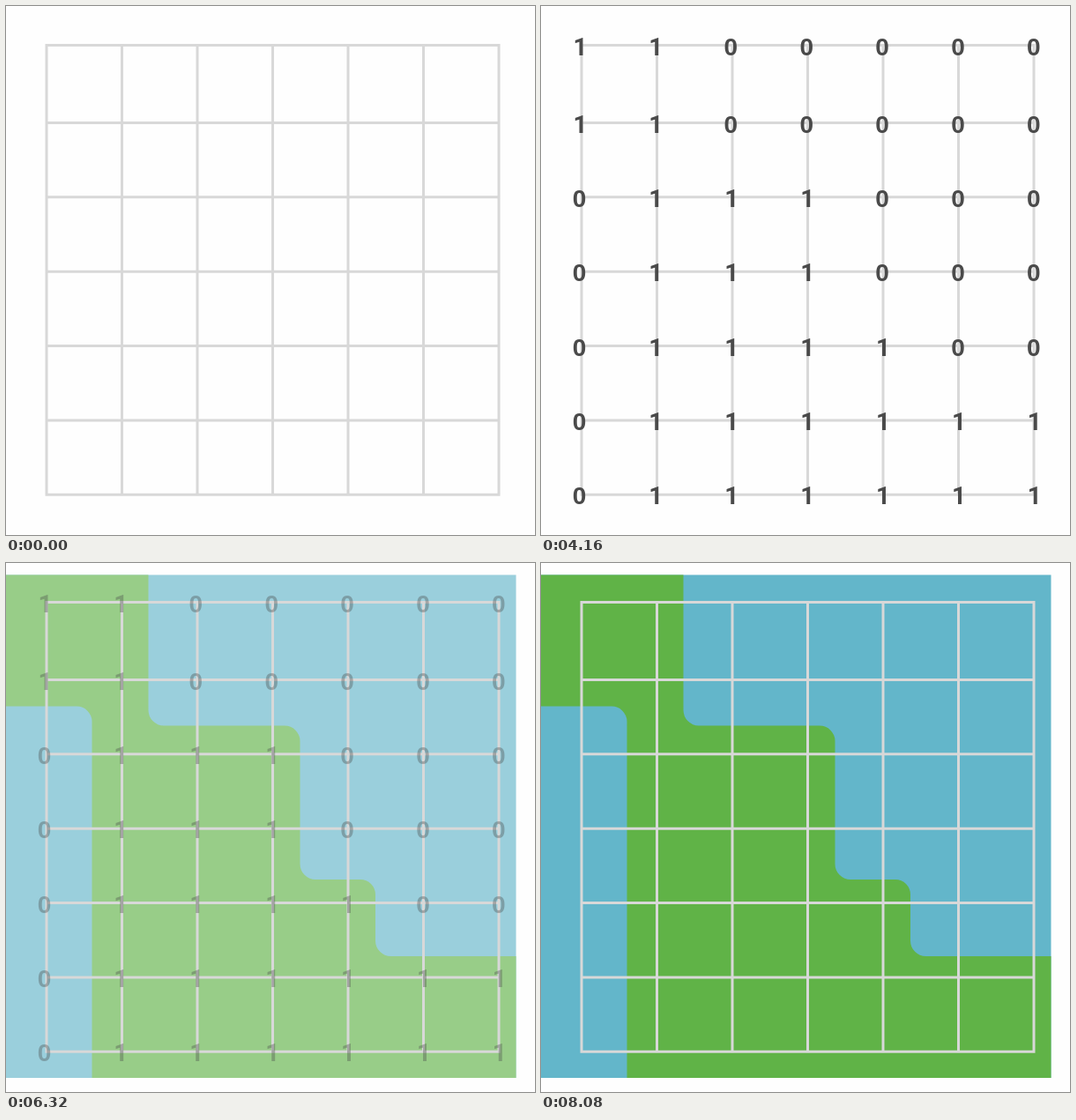
Write an HTML page that moves like this. It is 600 px wide and 600 px high and loops after 8.12 s.

```html
<!DOCTYPE html>
<html lang="en">
<head>
<meta charset="utf-8">
<title>Grid threshold</title>
<style>
  html, body { margin: 0; width: 100%; height: 100%; overflow: hidden; background: #fefefe; }
  svg { display: block; width: 100%; height: 100%; }
  text { font: bold 28px "Liberation Sans", Arial, sans-serif; fill: #4a4a4a; text-anchor: middle; }
  .one { font-family: Roboto, sans-serif; }
</style>
</head>
<body>
<svg viewBox="0 0 600 600">
  <g id="map" opacity="0">
    <rect y="13.5" width="578.5" height="570.5" fill="#63b6ca"/>
    <path fill="#60b347" d="M0 13.5H161.5V167a17.5 17.5 0 0 0 17.5 17.5H316a17.5 17.5 0 0 1 17.5 17.5V341.5
      a17.5 17.5 0 0 0 17.5 17.5H402a17 17 0 0 1 17 17V428.5a17.5 17.5 0 0 0 17.5 17.5H578.5V584H97.5V180
      a17.5 17.5 0 0 0 -17.5 -17.5H0Z"/>
  </g>
  <path id="grid" fill="none" stroke="#d8d8d8" stroke-width="3" stroke-linecap="square"/>
  <g id="decimals" opacity="0"></g>
  <g id="bits" opacity="0"></g>
</svg>
<script>
const LOOP = 8120;
const field = [
  [.6, .7, .4, .3, .3, .4, .1],
  [.5, .5, .3, .4, .1, .1, 0],
  [0, 1, .9, .8, .4, .3, .2],
  [.2, .9, .9, .9, .4, .2, .1],
  [0, .8, .7, .7, .6, .4, .4],
  [.2, .8, .7, .8, .7, .6, .6],
  [.3, .7, .6, .7, .6, .5, .5]
];
const [map, grid, decimals, bits] =
  ["map", "grid", "decimals", "bits"].map(id => document.getElementById(id));

const lineX = i => 46 + 85.5 * i;
const lineY = j => j ? 132.5 + 84.35 * (j - 1) : 44.5;

grid.setAttribute("d", field.map((_, i) =>
  `M${lineX(i)} ${lineY(0)}V${lineY(6)}M${lineX(0)} ${lineY(i)}H${lineX(6)}`).join(""));

// The digit 1 is set in a face where it has no foot.
const label = (string, i, j) => {
  const x = 43.5 + 85.9 * i + (string === "1" ? 1 : 0);
  const y = lineY(j) + 11;
  return `<text x="${x}" y="${y}">${string.replace("1", '<tspan class="one">1</tspan>')}</text>`;
};
const labels = format =>
  field.map((row, j) => row.map((v, i) => label(format(v), i, j)).join("")).join("");

decimals.innerHTML = labels(v => v.toFixed(1));
bits.innerHTML = labels(v => v >= .5 ? "1" : "0");

const ramp = (t, start, duration) => Math.min(1, Math.max(0, (t - start) / duration));

function draw(t) {
  const appear = ramp(t, 600, 800);
  const swap = ramp(t, 2400, 1000);
  const paint = ramp(t, 5680, 1000);
  decimals.setAttribute("opacity", appear * (1 - swap));
  bits.setAttribute("opacity", swap * (1 - paint));
  map.setAttribute("opacity", paint);
}

const start = performance.now();
function tick() {
  draw((performance.now() - start) % LOOP);
  requestAnimationFrame(tick);
}
tick();
</script>
</body>
</html>
```
